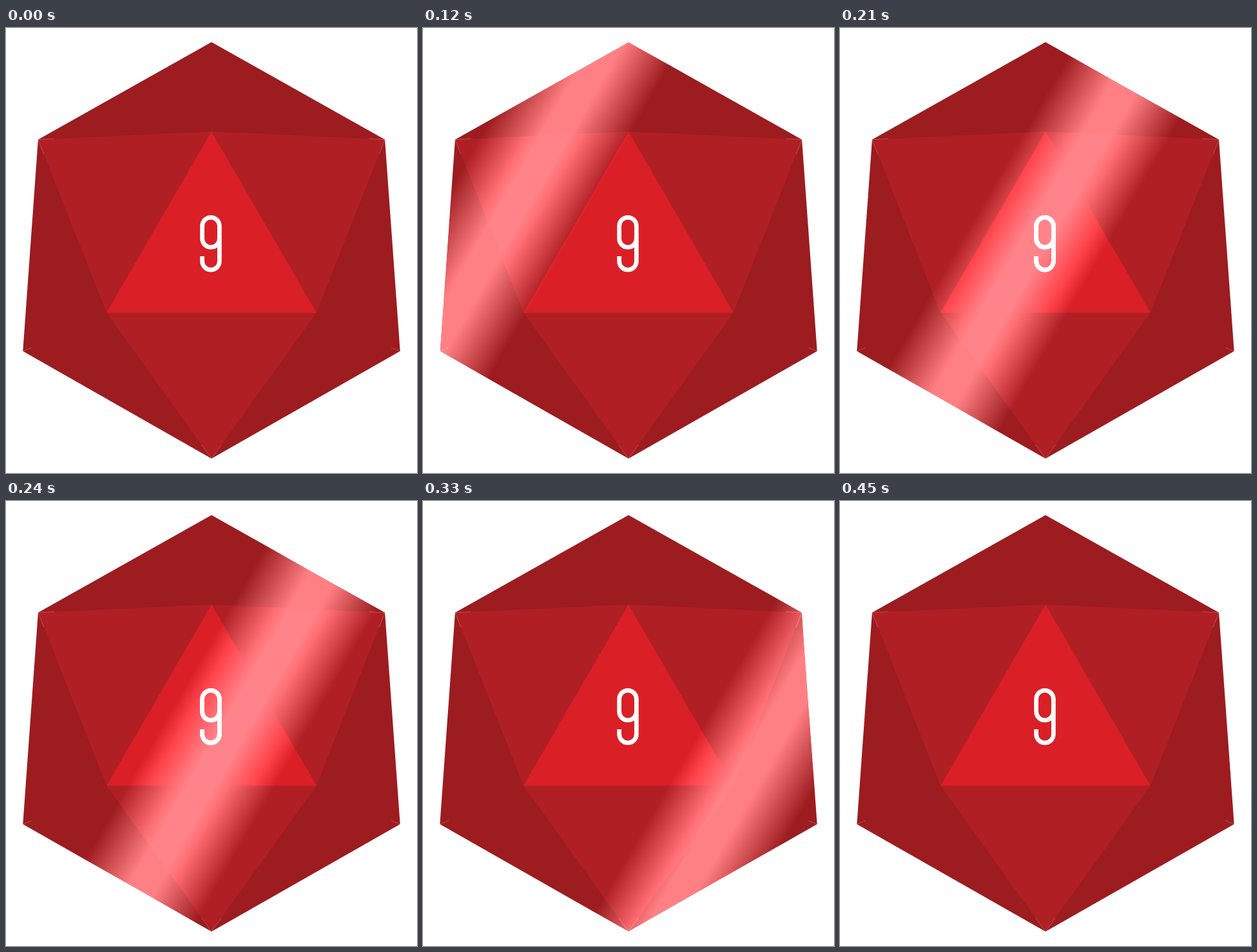
These frames come from a looping animation (640x694 px, 4.5 s). An HTML page with a canvas:

```html
<!DOCTYPE html>
<html lang="en">
<head>
<meta charset="utf-8">
<title>Twenty-sided die with a glint</title>
<style>
  html, body { margin: 0; width: 100%; height: 100%; overflow: hidden; background: #fff; }
  canvas { display: block; }
</style>
</head>
<body>
<canvas id="stage" width="640" height="694"></canvas>
<script>
const ctx = document.getElementById('stage').getContext('2d');
const LOOP = 4500, STEP = 30, STEPS = 15;
const HALF_WIDTH = 100, SPEED = 55.8, START = 39;
const NX = Math.cos(Math.PI / 6), NY = 0.5; // the glint travels along this direction

const mirror = ([x, y]) => [640 - x, y];
const apex = [320, 22], foot = [320, 671.5], peak = [320, 161.5];
const upL = [50, 174], lowL = [26.3, 504], baseL = [156.5, 444];
const upR = mirror(upL), lowR = mirror(lowL), baseR = mirror(baseL);

const faces = [
  ['#9c1c20', apex, upR, lowR, foot, lowL, upL],
  ['#b01f24', upL, peak, upR, baseR, foot, baseL],
  ['#da1f26', peak, baseR, baseL]
];

// Thin light slivers where faces meet at the corners
const slivers = [
  [upL, [75, 172.6]], [upL, [59, 197]],
  [lowL, [40, 498.5]], [foot, [304.5, 650]]
];

const digit = new Path2D(
  'M305.6 356V363.8A13.4 13.4 0 0 0 332.4 363.8V308.7' +
  'A13.4 13.4 0 0 0 305.6 308.7V328.5A13.4 13.4 0 0 0 332.4 328.5');

function trace(points) {
  ctx.beginPath();
  points.forEach(p => ctx.lineTo(...p));
}

function drawDie() {
  for (const [color, ...points] of faces) {
    trace(points);
    ctx.fillStyle = color;
    ctx.fill();
  }
  ctx.strokeStyle = 'rgba(255, 225, 200, 0.35)';
  ctx.lineWidth = 0.7;
  for (const line of slivers) {
    for (const points of [line, line.map(mirror)]) {
      trace(points);
      ctx.stroke();
    }
  }
  ctx.strokeStyle = '#fff';
  ctx.lineWidth = 6.8;
  ctx.stroke(digit);
}

// Adds a soft diagonal band of light; white areas stay white
function drawGlint(center) {
  const from = center - HALF_WIDTH, to = center + HALF_WIDTH;
  const light = ctx.createLinearGradient(NX * from, NY * from, NX * to, NY * to);
  [[0, 0], [0.4, 0.392], [0.6, 0.392], [1, 0]].forEach(([at, alpha]) =>
    light.addColorStop(at, `rgba(255, 255, 255, ${alpha})`));
  ctx.globalCompositeOperation = 'lighter';
  ctx.fillStyle = light;
  ctx.fillRect(0, 0, 640, 694);
  ctx.globalCompositeOperation = 'source-over';
}

function draw(time) {
  const step = Math.floor(time % LOOP / STEP);
  ctx.fillStyle = '#fff';
  ctx.fillRect(0, 0, 640, 694);
  drawDie();
  if (step > 0 && step < STEPS) drawGlint(START + SPEED * step);
}

const begin = performance.now();
function tick() {
  draw(performance.now() - begin);
  requestAnimationFrame(tick);
}
tick();
</script>
</body>
</html>
```
